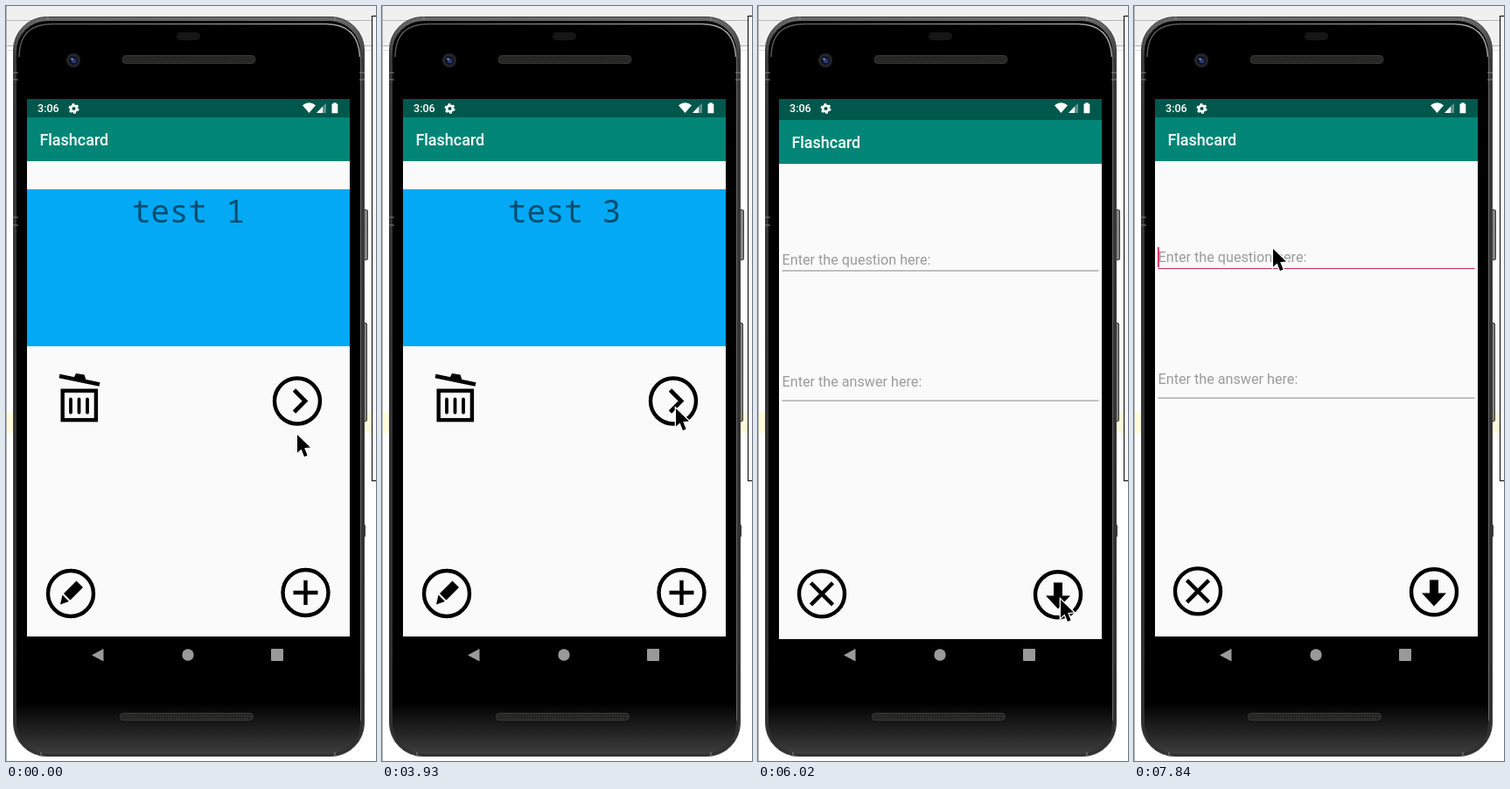
Animation, 423 px wide and 861 px high, one loop 8 s. Source, as an HTML page:

```html
<!DOCTYPE html>
<html lang="en">
<head>
<meta charset="utf-8">
<title>Flashcard app</title>
<style>
html, body { margin: 0; width: 100%; height: 100%; overflow: hidden; background: #fff; }
svg { display: block; width: 423px; height: 861px; }
text { font-family: Roboto, sans-serif; }
.title { font-size: 17.95px; font-weight: 500; fill: #fff; }
.clock { font-size: 12.57px; font-weight: 500; fill: #fff; }
.hint { font-size: 16.16px; fill: #9b9b9b; }
.card { font: 35.9px "Noto Sans Mono", monospace; fill: #000; fill-opacity: .54; text-anchor: middle; }
.line { fill: none; stroke: #000; stroke-width: 4.4; }

.main, .dim, .form, .head, .one, .three, .press, .focus, .cursor {
  animation: 8s step-end infinite;
}
.main { animation-name: main; }
.dim { animation-name: dim; }
.form { animation-name: form; }
.head { animation-name: head; }
.one { animation-name: one; }
.three { animation-name: three; }
.press { animation-name: press; }
.focus { animation-name: focus; }
.cursor { animation-name: cursor; }

@keyframes main {
  0% { transform: none; opacity: 1; }
  73.75% { transform: translateY(-6px); opacity: 1; }
  75.25%, 100% { transform: none; opacity: 0; }
}
@keyframes dim { 0% { opacity: 0; } 73.75%, 100% { opacity: .1; } }
@keyframes form {
  0% { transform: translateY(14px); opacity: 0; }
  73.75% { transform: translateY(14px); opacity: 1; }
  75.25% { transform: translateY(3px); opacity: 1; }
  76.875%, 100% { transform: none; opacity: 1; }
}
@keyframes head { 0% { opacity: 0; } 75.25%, 100% { opacity: 1; } }
@keyframes one {
  0%, 13.625%, 41.75% { opacity: 1; }
  7%, 30.875%, 49.125%, 100% { opacity: 0; }
}
@keyframes three {
  0%, 13.625%, 41.75% { opacity: 0; }
  7%, 30.875%, 49.125%, 100% { opacity: 1; }
}
@keyframes press { 0%, 98%, 100% { fill: #9b9b9b; } 96.125% { fill: #757575; } }
@keyframes focus { 0% { opacity: 0; } 96.125%, 100% { opacity: 1; } }
@keyframes cursor {
  0% { transform: translate(333px, 489px); }
  1.625% { transform: translate(336px, 459px); }
  58% { transform: translate(350px, 575px); }
  59.5% { transform: translate(358px, 676px); }
  61.375% { transform: translate(346px, 677px); }
  85.75% { transform: translate(297px, 609px); }
  87.625% { transform: translate(143px, 336px); }
  89.375% { transform: translate(137px, 270px); }
  90.875% { transform: translate(143px, 226px); }
  92.375% { transform: translate(151px, 254px); }
  94.25% { transform: translate(159px, 274px); }
  96.125%, 100% { transform: translate(159px, 277px); }
}
</style>
</head>
<body>
<svg viewBox="0 0 423 861" width="423" height="861">
  <defs>
    <clipPath id="screen"><rect x="24" y="106" width="369" height="627"/></clipPath>
    <linearGradient id="frame" x2="0" y2="1">
      <stop offset="0" stop-color="#6a6a6a"/>
      <stop offset=".06" stop-color="#383838"/>
      <stop offset="1" stop-color="#303030"/>
    </linearGradient>
    <linearGradient id="glass" x2="0" y2="1">
      <stop offset=".93" stop-color="#000"/>
      <stop offset="1" stop-color="#3e3e3e"/>
    </linearGradient>
    <linearGradient id="shine">
      <stop offset="0" stop-color="#555"/>
      <stop offset="1" stop-color="#a8a8a8"/>
    </linearGradient>
    <pattern id="mesh" width="3" height="3" patternUnits="userSpaceOnUse">
      <rect width="3" height="3" fill="#1b1b1b"/>
      <path d="M0 0L3 3M3 0L0 3" stroke="#3a3a36" stroke-width=".7"/>
    </pattern>
    <g id="header">
      <rect x="24" y="106" width="369" height="21" fill="#00574b"/>
      <rect x="24" y="127" width="369" height="50" fill="#008577"/>
      <text class="title" x="38.4" y="159">Flashcard</text>
    </g>
    <circle id="ring" class="line" r="26"/>
  </defs>

  <!-- Desktop behind the phone -->
  <rect width="423" height="861" fill="#fff"/>
  <rect width="423" height="46" fill="#f0f0f0"/>
  <path d="M0 16.5H418M0 45.5H418" stroke="#b5b5b5"/>
  <path d="M0 50.5H418" stroke="#dcdcdc"/>
  <rect y="463" width="418" height="24" fill="#fffbd9"/>
  <path d="M.5 0V861" stroke="#b0b0b0"/>
  <rect x="418.5" y="11.5" width="20" height="530" fill="#fafafa" stroke="#000"/>

  <!-- Phone body -->
  <g fill="#858585" stroke="#3a3a3a">
    <rect x="407.5" y="232.5" width="6" height="57" rx="1.5"/>
    <rect x="407.5" y="361.5" width="5" height="112" rx="1.5"/>
    <rect x="407.5" y="591.5" width="3" height="14" rx="1"/>
  </g>
  <rect x="8.5" y="12.5" width="401" height="843" rx="38" fill="url(#frame)" stroke="#3c3c3c"/>
  <rect x="12" y="17" width="393" height="836" rx="35" fill="url(#glass)"/>
  <path d="M15 58Q15 21 52 20.5H366Q403 21 404.5 58" fill="none" stroke="url(#shine)" stroke-width="1.5"/>
  <path d="M405.5 58V815" stroke="#666"/>
  <path d="M8 241h6M8 250h6M8 76h6M8 84h6M404 76h6M404 84h6M48 12v5M376 12v5M40 851v5M376 851v5" stroke="#858585"/>
  <rect x="195" y="30" width="27" height="9" rx="4.5" fill="#161616"/>
  <circle cx="77" cy="62" r="8" fill="#262628"/>
  <circle cx="77" cy="62" r="5.2" fill="#10142c"/>
  <circle cx="77.5" cy="62.5" r="2.6" fill="#2c3d78"/>
  <circle cx="75.5" cy="60.5" r="1.1" fill="#aab6dc"/>
  <rect x="133" y="56.5" width="152" height="9" rx="4" fill="url(#mesh)" stroke="#363636"/>
  <rect x="130.5" y="806.5" width="152" height="8" rx="3.5" fill="url(#mesh)" stroke="#363636"/>

  <!-- Navigation bar -->
  <g fill="#999">
    <path d="M98 740.3L111.5 733V747.5z"/>
    <circle cx="208" cy="740" r="6.7"/>
    <rect x="303" y="733" width="14" height="14" rx="1"/>
  </g>

  <g clip-path="url(#screen)">
    <g class="main">
      <rect x="24" y="106" width="369" height="613" fill="#fafafa"/>
      <use href="#header"/>
      <rect x="24" y="209" width="369" height="179" fill="#03a9f4"/>
      <text class="card one" x="208.5" y="247">test 1</text>
      <text class="card three" x="208.5" y="247">test 3</text>

      <path class="line" d="M61 422L107 431.5"/>
      <path d="M77 425L80 419L89.5 420.5L92 428z"/>
      <rect class="line" x="64.7" y="438.7" width="38.2" height="33.4"/>
      <path class="line" d="M74 448.5V463.5M83.5 448.5V463.5M93 448.5V463.5" stroke-linecap="round" style="stroke-width:3.8"/>

      <use href="#ring" x="333" y="450.5"/>
      <path class="line" d="M329.5 438L342 450.5L329.5 463" style="stroke-width:4.8"/>

      <use href="#ring" x="74" y="670"/>
      <path d="M80.5 655.5L88 663L73.5 677.5L66 670zM64.5 671.5L72 679L62 682.5z"/>

      <use href="#ring" x="342.5" y="669"/>
      <path class="line" d="M328.5 669H356.5M342.5 655V683"/>
      <rect class="dim" x="24" y="106" width="369" height="613"/>
    </g>

    <g class="form">
      <g class="head">
        <rect x="24" y="106" width="369" height="79" fill="#fafafa"/>
        <rect x="24" y="102" width="369" height="5" fill="#00574b"/>
        <use href="#header"/>
      </g>
      <rect x="24" y="184" width="369" height="535" fill="#fafafa"/>
      <text class="hint press" x="27.6" y="292">Enter the question here:</text>
      <text class="hint" x="27.6" y="431">Enter the answer here:</text>
      <g fill="#7a7a7a">
        <rect x="27.5" y="298.5" width="362" height=".9"/>
        <rect x="27.5" y="446.6" width="362" height=".9"/>
      </g>
      <g class="focus">
        <rect x="27" y="298" width="363" height="2" fill="#fafafa"/>
        <rect x="27.5" y="299" width="362" height="1" fill="#b8325f"/>
        <rect x="27" y="275" width="1.7" height="23" fill="#d0205c"/>
      </g>

      <use href="#ring" x="73" y="667.4"/>
      <path class="line" d="M60.5 654.9L85.5 679.9M85.5 654.9L60.5 679.9"/>
      <use href="#ring" x="343" y="668.3"/>
      <path d="M338 654.5H348V669.5H357L343 684.5L329 669.5H338z"/>
    </g>
  </g>

  <!-- Status icons -->
  <text class="clock" x="36" y="121.2">3:06</text>
  <g fill="none" stroke="#fff">
    <circle cx="77.5" cy="117" r="3.4" stroke-width="2.7"/>
    <circle cx="77.5" cy="117" r="5.1" stroke-width="1.9" stroke-dasharray="2.67"/>
  </g>
  <path d="M339 113.2Q346.5 107.4 354 113.2L346.5 122z" fill="#fff"/>
  <path d="M366 110.5V122H355z" fill="#fff" opacity=".35"/>
  <path d="M362 114.7V122H355z" fill="#fff"/>
  <path d="M374.3 110.2h3.2v1.3h1.8v10.8h-6.8v-10.8h1.8z" fill="#fff"/>

  <path class="cursor" d="M0 0V20.5L4.6 16.4L8 25L11.6 23.5L8.2 15L15 14.5z"
    stroke="#fff" stroke-width="2.6" paint-order="stroke"/>
</svg>
</body>
</html>
```
